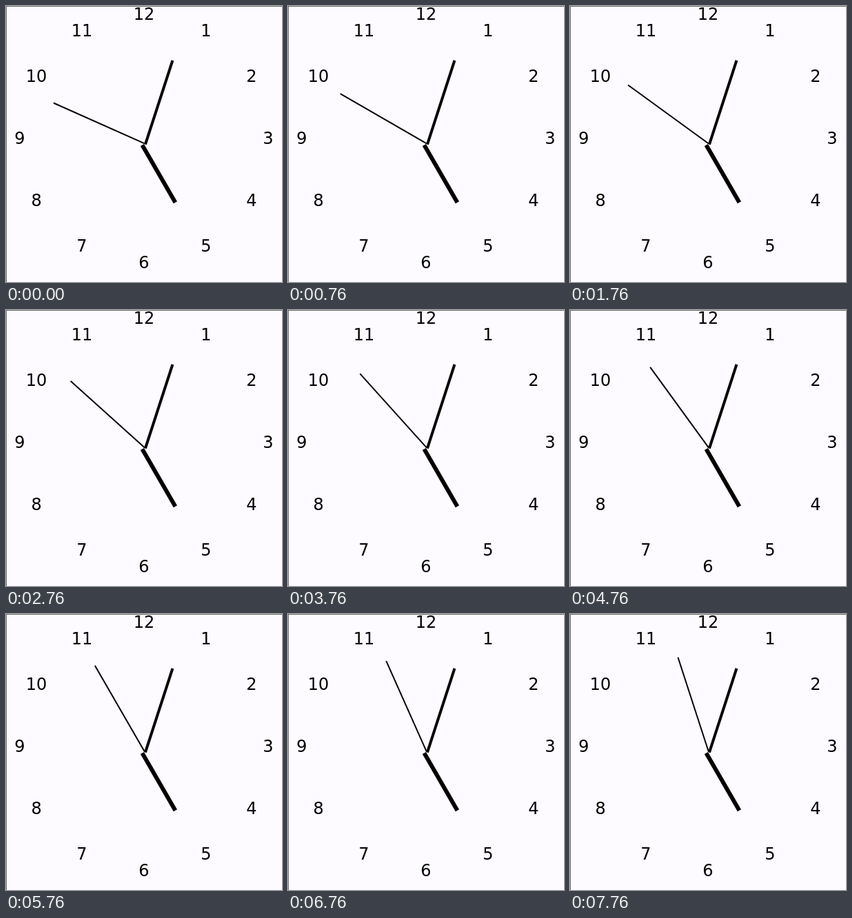
Recreate the animation shown at these times as an HTML page. Size 400 by 400 pixels, loop 8000 ms.

```html
<!DOCTYPE html>
<html lang="en">
<head>
<meta charset="utf-8">
<title>Clock</title>
<style>
  html, body { margin: 0; width: 100%; height: 100%; overflow: hidden; background: #fdfbff; }
  svg { display: block; width: 100vw; height: 100vh; }
  text { font: 24px "DejaVu Sans", sans-serif; text-anchor: middle; }
</style>
</head>
<body>
<svg viewBox="0 0 400 400">
  <rect width="400" height="400" fill="#fdfbff"/>
  <path d="M0 .5H400M.5 0V400" stroke="#666" fill="none"/>
  <g id="numbers"></g>
  <g id="hands"></g>
</svg>
<script>
const LOOP = 8000;
const FIRST_TICK = 760;
const START_SECOND = 49;

function add(parent, tag, attrs) {
  const el = document.createElementNS('http://www.w3.org/2000/svg', tag);
  for (const key in attrs) el.setAttribute(key, attrs[key]);
  return document.getElementById(parent).appendChild(el);
}

function rotate(el, degrees) {
  el.setAttribute('transform', `translate(200 200) rotate(${degrees})`);
}

// Each hand pivots on its lower left corner.
function addHand(width, length, degrees) {
  const hand = add('hands', 'rect', { y: -length, width, height: length });
  rotate(hand, degrees);
  return hand;
}

for (let hour = 1; hour <= 12; hour++) {
  const angle = hour * Math.PI / 6;
  const x = 200 + 180 * Math.sin(angle);
  const y = 200 - 180 * Math.cos(angle);
  add('numbers', 'text', { x, y }).textContent = hour;
}

addHand(6, 96, 150);
addHand(4, 128, 18);
const secondHand = addHand(2, 144, START_SECOND * 6);

const start = performance.now();
function draw() {
  const t = (performance.now() - start) % LOOP;
  const ticks = Math.floor((t - FIRST_TICK) / 1000) + 1;
  rotate(secondHand, (START_SECOND + ticks) * 6);
  requestAnimationFrame(draw);
}
draw();
</script>
</body>
</html>
```
